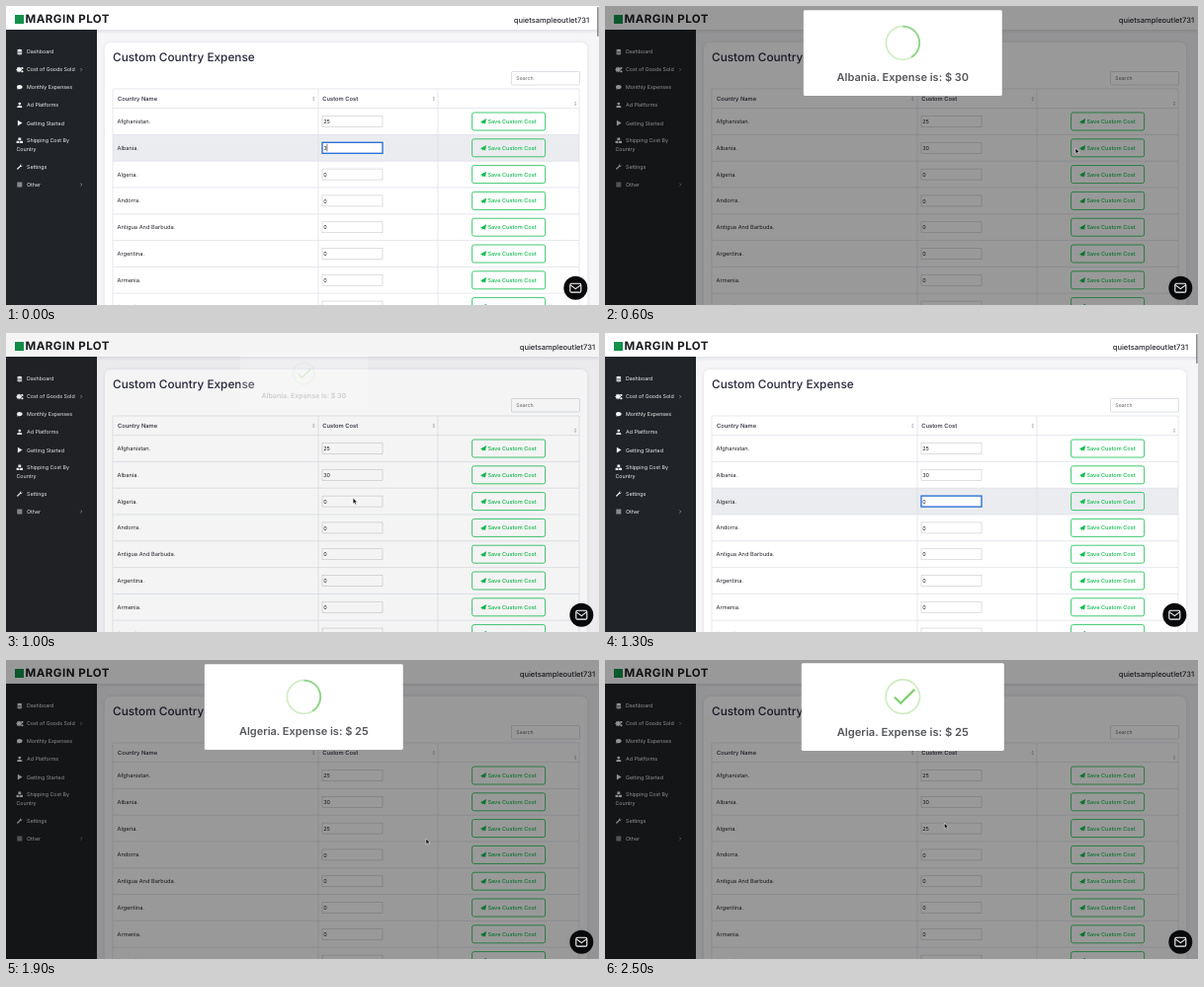
Animation of 600x303 px, one loop 2600 ms. Source, as an HTML page:

```html
<!DOCTYPE html>
<html lang="en">
<head>
<meta charset="utf-8">
<title>Custom Country Expense</title>
<style>
  html, body { margin: 0; width: 100%; height: 100%; overflow: hidden; background: #fff; }
  svg { display: block; width: 100vw; height: 100vh; }
  text { font-family: Inter, "Open Sans", sans-serif; text-rendering: geometricPrecision; white-space: pre; }
</style>
</head>
<body>
<svg id="stage" viewBox="0 0 600 303" xmlns="http://www.w3.org/2000/svg"></svg>
<script>
const NS = 'http://www.w3.org/2000/svg';
const STEP = 100, LOOP = 2600;
const GREEN = '#12bd4f', INK = '#26273a', LINE = '#dcdfe5';
const stage = document.getElementById('stage');

function add(parent, tag, attrs = {}, content) {
  const el = document.createElementNS(NS, tag);
  set(el, attrs);
  if (content !== undefined) el.textContent = content;
  parent.appendChild(el);
  return el;
}
function set(el, attrs) {
  for (const k in attrs) el.setAttribute(k, attrs[k]);
}
const rect = (p, x, y, width, height, attrs) => add(p, 'rect', { x, y, width, height, ...attrs });
const path = (p, d, attrs) => add(p, 'path', { d, ...attrs });
const label = (p, x, y, size, fill, str, attrs) =>
  add(p, 'text', { x, y, 'font-size': size, fill, ...attrs }, str);
const group = (p, x = 0, y = 0) => add(p, 'g', { transform: `translate(${x} ${y})` });
const show = (el, on) => el.setAttribute('visibility', on ? 'visible' : 'hidden');

// Linear interpolation over rows of [time, value, value...]
function track(rows, t) {
  if (t <= rows[0][0]) return rows[0].slice(1);
  for (let i = 1; i < rows.length; i++) {
    const a = rows[i - 1], b = rows[i];
    if (t <= b[0]) {
      const k = (t - a[0]) / (b[0] - a[0]);
      return a.slice(1).map((v, j) => v + (b[j + 1] - v) * k);
    }
  }
  return rows[rows.length - 1].slice(1);
}
const within = (t, from, to) => t >= from && t < to;

// Page and card
const defs = add(stage, 'defs');
const blur = add(defs, 'filter', { id: 'soft', x: '-10%', y: '-10%', width: '120%', height: '120%' });
add(blur, 'feGaussianBlur', { stdDeviation: 2 });
rect(stage, 0, 0, 600, 303, { fill: '#f6f6f9' });
rect(stage, 100, 37, 488, 290, { rx: 6, fill: '#dfe0e6', filter: 'url(#soft)' });
rect(stage, 100, 37, 488, 290, { rx: 6, fill: '#fff' });

// Top bar
rect(stage, 0, 1, 600, 24, { fill: '#d5d6dc', filter: 'url(#soft)' });
rect(stage, 0, 0, 600, 24, { fill: '#fff' });
rect(stage, 9, 9, 9, 9, { fill: '#12924a' });
label(stage, 19.5, 17.3, 11.5, '#17191d', 'MARGIN PLOT', { 'font-weight': 700, 'letter-spacing': 0.5 });
const account = label(stage, 590, 17.2, 7.5, '#25262d', 'quietsampleoutlet731',
  { 'font-weight': 500, 'text-anchor': 'end' });

// Sidebar
rect(stage, 0, 24, 92, 279, { fill: '#202327' });
const icons = {
  stack: 'M-2.3-2.2Q0-3.3 2.3-2.2V-1Q0 0-2.3-1ZM-2.3-.5Q0 .5 2.3-.5V.8Q0 1.8-2.3.8ZM-2.3 1.3Q0 2.3 2.3 1.3V2.5Q0 3.4-2.3 2.5Z',
  gears: 'M-3.4-.5h.6l.3-.7-.4-.5.6-.6.6.4.6-.3v-.6h.9v.6l.6.3.6-.4.6.6-.4.5.3.7h.6v.9h-.6l-.3.7.4.5-.6.6-.6-.4-.6.3v.6h-.9v-.6l-.6-.3-.6.4-.6-.6.4-.5-.3-.7h-.6ZM2-2.6h1.2v.5h.6v1h-.6v.5H2v-.5h-.6v-1H2ZM2 .8h1.2v.5h.6v1h-.6v.5H2v-.5h-.6v-1H2Z',
  chat: 'M0-2.4C3.8-2.4 3.8 1.8 0 1.8Q-.8 1.8-1.4 1.5L-2.9 2.2-2.2.9C-3.7-.7-2.2-2.4 0-2.4Z',
  user: 'M0-2.8A1.4 1.4 0 0 1 0 0A1.4 1.4 0 0 1 0-2.8ZM-2.5 2.6V1.8Q-2.4.4-1 .4H1Q2.4.4 2.5 1.8V2.6Z',
  play: 'M-1.9-2.8L2.7 0-1.9 2.8Z',
  boxes: 'M-1.4-2.8H1.4V-.3H-1.4ZM-3.2.3H-.3V2.7H-3.2ZM.3.3H3.2V2.7H.3Z',
  wrench: 'M-2.7 1.8L.2-1Q0-2.6 1.8-2.8L1-1.6 1.6-.9 2.8-1.7Q2.6.2.9 0L-1.9 2.7Q-2.8 2.8-2.7 1.8Z',
  lines: 'M-2.5-2.2h5v.8h-5ZM-2.5-.4h5v.8h-5ZM-2.5 1.4h5v.8h-5Z'
};
const menu = [
  ['stack', 46.5, 'Dashboard'], ['gears', 64.5, 'Cost of Goods Sold', true],
  ['chat', 82.5, 'Monthly Expenses'], ['user', 100.5, 'Ad Platforms'],
  ['play', 118.6, 'Getting Started'], ['boxes', 136.4, 'Shipping Cost By'],
  ['wrench', 163, 'Settings'], ['lines', 181, 'Other', true]
];
for (const [icon, y, name, more] of menu) {
  path(group(stage, 13.8, y), icons[icon], { fill: '#f1f2f3' });
  label(stage, 21, y + 1.9, 5.3, '#f1f2f3', name);
  if (more) path(group(stage, 76, y), 'M-.6-1.4L.8 0-.6 1.4', { fill: 'none', stroke: '#b9bcc0', 'stroke-width': 0.6 });
}
label(stage, 10.5, 147, 5.3, '#f1f2f3', 'Country');

// Card heading
label(stage, 108, 56, 11.8, INK, 'Custom Country Expense', { 'font-weight': 500 });
rect(stage, 511.5, 66.5, 69, 13.5, { rx: 0.8, fill: '#fff', stroke: '#cfd2d8', 'stroke-width': 0.7 });
label(stage, 516.3, 75.2, 5.2, '#62656c', 'Search');

// Table
const TOP = 103.6, PITCH = 26.8;
const hoverRow = rect(stage, 108, 0, 472, PITCH, { fill: '#ebecf0' });
const stroke = { stroke: LINE, 'stroke-width': 0.7, fill: 'none' };
for (const x of [108, 316, 437, 580]) path(stage, `M${x} 84V303`, stroke);
path(stage, `M108 84H580M108 ${TOP}H580`, stroke);
label(stage, 113, 95.8, 5.8, INK, 'Country Name', { 'font-weight': 500 });
label(stage, 320.3, 95.8, 5.8, INK, 'Custom Cost', { 'font-weight': 500 });
for (const [x, y] of [[311.3, 94], [432.8, 94], [576, 98.8]])
  path(group(stage, x, y), 'M-1.3-.5L0-2.4 1.3-.5ZM-1.3.5L0 2.4 1.3.5Z', { fill: '#b6b9c0' });

const PLANE = 'M-3 .5L3-2.9 2 2.6 0 1.6-1.1 2.9-1.3 1.2Z';
const countries = ['Afghanistan', 'Albania', 'Algeria', 'Andorra', 'Antigua And Barbuda',
  'Argentina', 'Armenia', 'Australia'];
const rows = countries.map((name, i) => {
  const mid = TOP + PITCH * (i + 0.5);
  path(stage, `M108 ${mid + PITCH / 2}H580`, stroke);
  label(stage, 112.5, mid + 1.9, 5.7, '#24252b', name + '.');
  const box = rect(stage, 320, mid - 5.5, 61, 11, { fill: '#fff', stroke: '#cfd1d5', 'stroke-width': 0.7 });
  const value = label(stage, 321.2, mid + 2.2, 5.5, '#1c1d21', i ? '0' : '25');
  const fill = rect(stage, 471.6, mid - 9, 74, 18, { rx: 2, fill: GREEN, 'fill-opacity': 0, stroke: GREEN, 'stroke-width': 0.8 });
  const face = group(stage, 483, mid);
  path(face, PLANE);
  label(face, 4.4, 2, 5.6, null, 'Save Custom Cost', { 'font-weight': 500 }).removeAttribute('fill');
  return { mid, box, value, fill, face };
});
const caret = path(stage, 'M324.9 139.8v7.6', { stroke: '#222', 'stroke-width': 0.6 });
const scrollbar = rect(stage, 598, 1, 1.7, 30, { rx: 0.8, fill: '#8d8e91' });

// Dialog
const shade = rect(stage, 0, 0, 600, 303, { fill: '#000' });
const dialog = add(stage, 'g');
rect(dialog, -102.5, -44.3, 205, 88.6, { rx: 1.5, fill: '#fff' });
add(dialog, 'circle', { cx: 0, cy: -10.4, r: 17.2, fill: 'none', stroke: '#d2edc6', 'stroke-width': 1.8 });
const arc = path(dialog, 'M0-27.6A17.2 17.2 0 0 1 9 4.3', { fill: 'none', stroke: '#8fd488', 'stroke-width': 1.7 });
const check = path(dialog, 'M-8.6-9.4L-2.9-3.8 10.6-17.2', {
  fill: 'none', stroke: '#7fd06a', 'stroke-width': 2.2, 'stroke-linecap': 'round', pathLength: 100
});
const message = label(dialog, 0, 29.4, 11.2, '#55565a', '', { 'font-weight': 600, 'text-anchor': 'middle' });

// Contact bubble
const bubble = group(stage);
add(bubble, 'circle', { r: 12, fill: '#08090a' });
rect(bubble, -5.5, -4.4, 11, 8.8, { rx: 1.4, fill: 'none', stroke: '#fff', 'stroke-width': 1.1 });
path(bubble, 'M-5-2.8L0 .9 5-2.8', { fill: 'none', stroke: '#fff', 'stroke-width': 1.1 });

// Pointers
const pointer = add(stage, 'g');
const edge = { stroke: '#fff', 'stroke-width': 0.5, 'stroke-linejoin': 'round' };
const shapes = {
  arrow: path(pointer, 'M0 0V5.6L1.3 4.5 2.2 6.5 3.2 6 2.3 4.1H4Z', { fill: '#000', ...edge }),
  hand: path(pointer, 'M-.6.2Q0-.7.6.2V2.3Q1.3 1.9 1.7 2.5 2.4 2.2 2.7 2.9 3.5 2.8 3.5 3.6V4.9L2.8 7H-.7L-2.6 4.4Q-2.7 3.3-1.5 3.7L-.6 4.4Z',
    { fill: '#fff', stroke: '#111', 'stroke-width': 0.6, 'stroke-linejoin': 'round' }),
  beam: path(pointer, 'M-1.2-3.3Q0-3.3 0-2.6 0-3.3 1.2-3.3M0-2.6V2.6M-1.2 3.3Q0 3.3 0 2.6 0 3.3 1.2 3.3',
    { fill: 'none', stroke: '#222', 'stroke-width': 0.6 })
};

const pointerPath = [
  [200, 400, 150], [300, 436, 147], [400, 468, 144], [500, 478, 142.5], [600, 476, 144],
  [700, 458, 151], [800, 418, 159], [900, 378, 162.8], [1000, 351.2, 167.3], [1100, 338, 170],
  [1200, 333, 170.5], [1400, 380, 176], [1500, 432, 180], [1600, 470, 178], [1700, 477, 173],
  [1800, 478, 171], [1900, 425, 181], [2000, 346, 188.8], [2100, 342, 181], [2300, 342, 170], [2500, 343.4, 165.2]
];
const dialogs = [
  { from: 600, to: 1100, close: 900, text: 'Albania. Expense is: $ 30', arcEnd: 800, tick: [[700, 0], [900, 100]], slide: [[900, -1.6, -0.4], [1000, 0, 0]] },
  { from: 1900, to: LOOP, close: LOOP, text: 'Algeria. Expense is: $ 25', arcEnd: 2200, tick: [[2200, 0], [2400, 100]], slide: [[2400, -1.6, -0.4], [2500, 0.8, 0]] }
];
const fills = { 1: [[300, 0], [400, 0.6], [500, 1]], 2: [[1500, 0], [1600, 0.06], [1700, 1], [1800, 1]] };

function drawTable(t, locked) {
  const hovered = t < 600 ? 1 : within(t, 1100, 1900) ? 2 : 0;
  const focused = t < 500 ? 1 : within(t, 1200, 1800) ? 2 : 0;
  show(hoverRow, hovered);
  set(hoverRow, { y: TOP + PITCH * hovered });
  rows[1].value.textContent = t < 100 ? '3' : '30';
  rows[2].value.textContent = t < 1400 ? '0' : t < 1500 ? '2' : '25';
  show(caret, t < 100);
  for (const i of [1, 2]) {
    const on = focused === i;
    set(rows[i].box, { stroke: on ? '#2f72d8' : '#cfd1d5', 'stroke-width': on ? 1.4 : 0.7 });
  }
  rows.forEach((row, i) => {
    const level = hovered === i && fills[i] ? track(fills[i], t)[0] : 0;
    const base = hovered === i ? 0 : 1;
    set(row.fill, { fill: level || !base ? GREEN : '#fff', 'fill-opacity': base || level });
    set(row.face, { fill: level > 0.5 ? '#fff' : GREEN });
  });
  show(scrollbar, !locked);
  set(account, { x: locked ? 596 : 590 });
  set(bubble, { transform: `translate(${locked ? 582.3 : 576.3} 285.7)` });
}

function drawDialog(t, d) {
  show(shade, d);
  show(dialog, d);
  show(arc, d && t < d.arcEnd);
  show(check, d && t > d.tick[0][0]);
  if (!d) return;
  const [scale, opacity, dim] = track([
    [d.from, 0.98, 1, 0.4], [d.from + 100, 1, 1, 0.4], [d.close, 1, 1, 0.4], [d.close + 100, 0.63, 0.24, 0.045]
  ], t);
  set(shade, { opacity: dim });
  set(dialog, { opacity, transform: `translate(301.3 47.6) scale(${scale})` });
  message.textContent = d.text;
  const [drawn] = track(d.tick, t), [dx, dy] = track(d.slide, t);
  set(check, { 'stroke-dasharray': `${drawn} 200`, transform: `translate(${dx} ${dy})` });
}

function drawPointer(t, locked) {
  const [x, y] = track(pointerPath, t);
  const kind = locked ? 'arrow' : x > 467 ? 'hand' : within(x, 320, 382) ? 'beam' : 'arrow';
  const on = t >= 200 && !within(t, 1300, 1500);
  set(pointer, { transform: `translate(${x} ${y})` });
  for (const k in shapes) show(shapes[k], on && k === kind);
}

function render(now) {
  const t = Math.floor((now % LOOP) / STEP) * STEP;
  const d = dialogs.find(o => within(t, o.from, o.to));
  drawTable(t, !!d);
  drawDialog(t, d);
  drawPointer(t, !!d);
}

const start = performance.now();
function tick() {
  render(performance.now() - start);
  requestAnimationFrame(tick);
}
tick();
</script>
</body>
</html>
```
